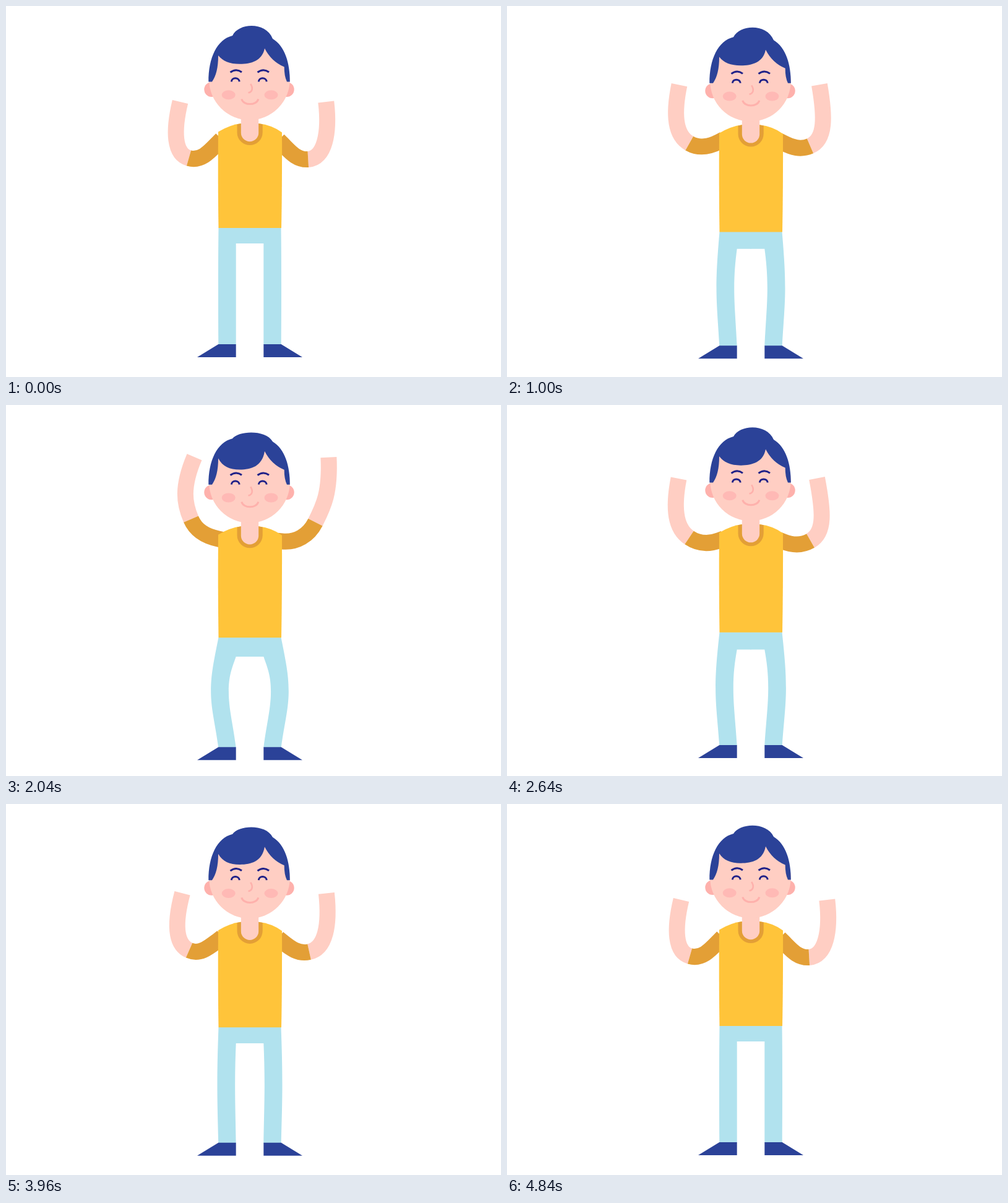
Recreate the animation shown at these times as an HTML page with a canvas. Size 800 by 600 pixels, loop 4880 ms.

```html
<!DOCTYPE html>
<html lang="en">
<head>
<meta charset="utf-8">
<title>Dancing man</title>
<style>
html, body { margin: 0; width: 100%; height: 100%; overflow: hidden; background: #fff; }
canvas { display: block; }
</style>
</head>
<body>
<canvas id="stage" width="800" height="600"></canvas>
<script>
const ctx = document.getElementById('stage').getContext('2d');
const SKIN = '#ffcec3', BLUSH = '#ffb9b5', PINK = '#feb1ac', SHIRT = '#ffc43a',
      SLEEVE = '#e39f36', PANTS = '#b1e2ee', BLUE = '#2b4298', INK = '#1f2188';
const LOOP = 4880, STEP = 40, BEAT = 800, START = 40, HAIR_LAG = 132, AXIS = 394;

// Arm poses: x, y and heading in degrees at shoulder, sleeve end and hand
const ARMS = [
  { low:   [343, 221, 134, 295.5, 246, 196, 281.5, 155, 283.5],
    right: [343, 216.5, 192, 299, 184.6, 246.4, 304.5, 84.2, 293],
    left:  [343, 217, 184, 293.5, 183, 231.4, 273.5, 83, 278.5] },
  { low:   [446, 222.5, 45, 488.3, 248, -3.4, 517.3, 155, -96.7],
    right: [446, 220.5, 6, 500, 189.6, -63, 521.4, 84.6, -92.8],
    left:  [446, 219, -2, 492.7, 191, -55.6, 484.7, 82, -105] }
];

function ease(x, x1, x2) {
  let lo = 0, hi = 1, s;
  for (let i = 0; i < 24; i++) {
    s = (lo + hi) / 2;
    const at = 3 * x1 * s * (1 - s) ** 2 + 3 * x2 * s * s * (1 - s) + s ** 3;
    if (at < x) lo = s; else hi = s;
  }
  return s * s * (3 - 2 * s);
}

// 0 standing, 1 fully crouched
function bounce(t, x1 = .17, x2 = .83) {
  if (t <= 0) return 0;
  const phase = t / BEAT % 1;
  return phase < .5 ? ease(phase * 2, .17, .83) : 1 - ease(phase * 2 - 1, x1, x2);
}

function fill(color, path) {
  ctx.fillStyle = color;
  ctx.fill(new Path2D(path));
}

function line(color, width, path) {
  ctx.strokeStyle = color;
  ctx.lineWidth = width;
  ctx.stroke(new Path2D(path));
}

function ellipse(color, x, y, rx, ry) {
  ctx.fillStyle = color;
  ctx.beginPath();
  ctx.ellipse(x, y, rx, ry, 0, 0, 7);
  ctx.fill();
}

function mirrored(draw) {
  draw();
  ctx.save();
  ctx.transform(-1, 0, 0, 1, AXIS * 2, 0);
  draw();
  ctx.restore();
}

function shifted(dy, draw) {
  ctx.save();
  ctx.translate(0, dy);
  draw();
  ctx.restore();
}

function along(x, y, degrees, distance) {
  const a = degrees * Math.PI / 180;
  return [x + Math.cos(a) * distance, y + Math.sin(a) * distance];
}

function curve(x0, y0, a0, x1, y1, a1, out, into) {
  const d = Math.hypot(x1 - x0, y1 - y0);
  return `C${along(x0, y0, a0, d * out)} ${along(x1, y1, a1, -d * into)} ${x1},${y1}`;
}

function drawArm(low, high, p) {
  const pose = low.map((v, i) => v + (high[i] - v) * p);
  const [sx, sy, sa, ex, ey, ea] = pose;
  line(SKIN, 26, `M${ex},${ey}` + curve(...pose.slice(3), .27, .53));
  line(SLEEVE, 26, `M${along(sx, sy, sa, -8)}L${sx},${sy}` +
    curve(sx, sy, sa, ex, ey, ea, .38, .38));
}

function drawLeg(p) {
  const waist = 358.5 + 17.3 * p, crotch = 384 + 23 * p, knee = 452 + 11 * p;
  const foot = 547.5 + 6.2 * p, bow = 11.8 * p;
  const outer = 343 - bow, inner = 371.7 - bow;
  fill(PANTS, `M394.5,${waist}H343.5
    C${343 - bow * .6},${waist + 38} ${outer},${knee - 28} ${outer},${knee}
    C${outer},${knee + 28} ${343 - bow * .45},${foot - 40} 343.3,${foot}
    H371.7C${371.7 - bow * .45},${foot - 40} ${inner},${knee + 28} ${inner},${knee}
    C${inner},${knee - 24} ${371.7 - bow * .6},${crotch + 20} 371.7,${crotch}H394.5Z`);
  fill(BLUE, `M309,${foot + 20.5}L343.3,${foot - .5}H371.7V${foot + 20.5}Z`);
}

function drawTorso(p) {
  const top = 6.2 * p, hem = 359 + 17.3 * p;
  fill(SHIRT, `M343,${203.5 + top}Q362,${192 + top} 380,${190 + top}H408
    Q430,${192.5 + top} 446,${204.5 + top}Q446.3,${290 + top} 445,${hem}
    H343.5Q342.3,${290 + top} 343,${203.5 + top}Z`);
  shifted(top, () => {
    fill(SLEEVE, 'M373.5,191.2L380,190H408L414.7,191.2V204.5A20.6,20.6 0 0 1 373.5,204.5Z');
    fill(SKIN, 'M379.8,176H408.2V205A14.2,14.2 0 0 1 379.8,205Z');
  });
}

function drawHead(h) {
  const fringe = 93.8 + 6.3 * h, bun = 11.6 * h;
  ellipse(PINK, 332.3, 135, 12, 12);
  ellipse(PINK, 453.7, 135, 12, 12);
  ellipse(SKIN, 393.5, 119, 65.3, 65.5);
  fill(BLUE, `M327.3,122.5C327,84 341,54 366,48
    C376,${27 + bun} 420,${25 + bun} 431,53C451,65 459,93 458.8,122.5H454
    Q449.5,113 449.7,98.5Q429,90 418,68.5
    C414,${fringe - 5} 396,${fringe} 378,${fringe}
    C361,${fringe} 350,${fringe - 5} 343,80C343,100 339.5,113 333,122.5Z`);
  for (const x of [0, 44]) {
    line(INK, 3, `M${362.5 + x},107.3Q${372 + x},100.3 ${381 + x},107`);
    line(INK, 3, `M${364.3 + x},122.3C${365 + x},115 ${376.3 + x},115 ${377.3 + x},122.3`);
  }
  ellipse(BLUSH, 359.7, 143.7, 11, 7.5);
  ellipse(BLUSH, 428.5, 143.7, 11, 7.5);
  line(PINK, 2.6, 'M395.2,126C399.5,132.5 398.5,139 391.5,140.3');
  line(PINK, 3, 'M380.8,150.5C383.5,161.3 405,161.3 407.8,150.5');
}

function draw(t) {
  const beat = t - START;
  const body = bounce(beat, .08, .8), lift = bounce(beat), hair = bounce(beat - HAIR_LAG);
  const side = Math.floor(beat / BEAT) % 2 === 1 ? 'left' : 'right';
  ctx.clearRect(0, 0, 800, 600);
  for (const arm of ARMS) drawArm(arm.low, arm[side], lift);
  mirrored(() => drawLeg(body));
  drawTorso(body);
  shifted(6.2 * body, () => drawHead(hair));
}

const begin = performance.now();
function tick() {
  const t = (performance.now() - begin) % LOOP;
  draw(Math.floor(t / STEP) * STEP);
  requestAnimationFrame(tick);
}
tick();
</script>
</body>
</html>
```
